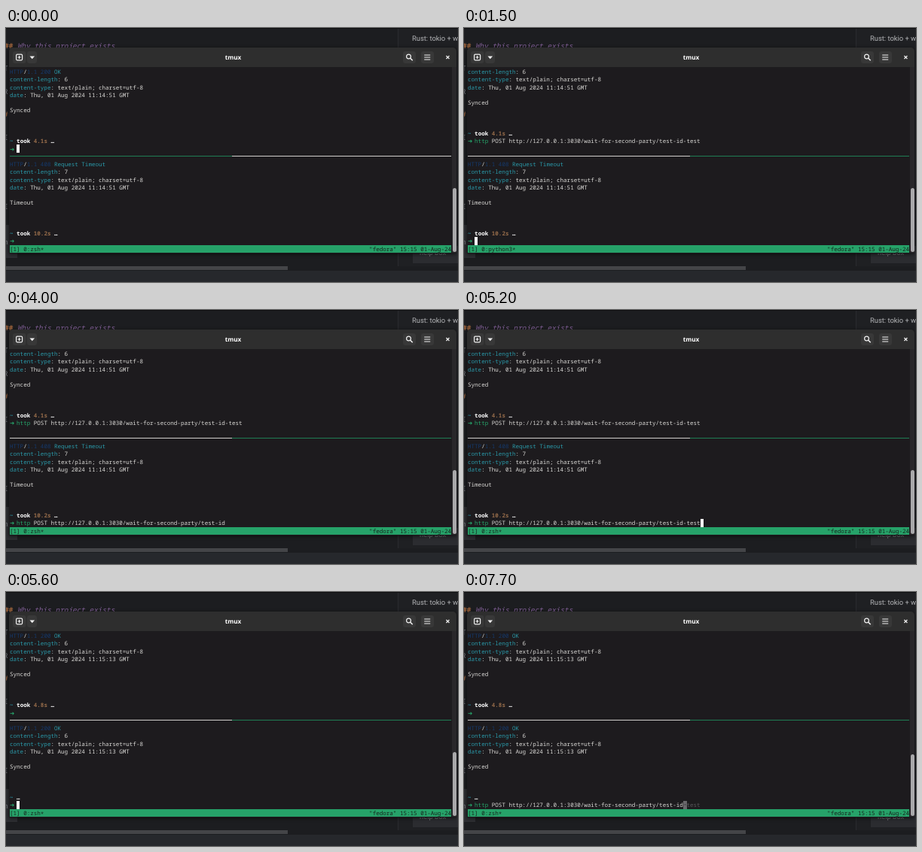
Animation of 600 by 338 pixels, one loop 8 s. Source, as an HTML page:

```html
<!DOCTYPE html>
<html lang="en">
<head>
<meta charset="utf-8">
<title>tmux</title>
<style>
  html, body { margin: 0; width: 100%; height: 100%; overflow: hidden; background: #1c1d20; }
  #stage { position: relative; width: 600px; height: 338px; overflow: hidden; text-rendering: geometricPrecision; }
  #stage div, svg { position: absolute; white-space: pre; }
  .mono, .row { font-family: "Noto Sans Mono", "DejaVu Sans Mono", monospace; }

  /* page behind the window */
  .side { left: 520px; top: 0; width: 80px; height: 317px; background: #1f2023; border-left: 1px solid #2a2b2f; }
  .brim { left: 0; top: 0; width: 600px; height: 1px; background: #0d0d0f; }
  .label { left: 539px; top: 8px; font: 9.4px/14px Roboto, sans-serif; color: #b4b5b8; }
  .heading { left: -2px; top: 17px; font-size: 9.4px; line-height: 14px; color: #84629a; font-style: italic; }
  .heading b { color: #a5683e; font-style: normal; }
  .edge { left: -3px; font-size: 9.4px; line-height: 12px; color: #77797e; }
  .card { left: 540px; top: 290px; width: 60px; height: 23px; background: #2b2c30; }
  .chip { left: 0; top: 262px; width: 15px; height: 44px; background: #2d2e32; }
  .hbar { left: 0; top: 317px; width: 374px; height: 5px; background: #444548; }
  .foot { left: 0; top: 323px; width: 600px; height: 15px; background: #26282c; }

  /* terminal window */
  .win { left: 4px; top: 26px; width: 594px; height: 273.5px; background: #1d1b1e; border-radius: 5px 5px 0 0; box-shadow: 0 1px 5px #0009; }
  .bar { left: 4px; top: 26px; width: 594px; height: 26px; background: #2e2e2e; border-radius: 5px 5px 0 0; }
  .title { left: 5px; top: 33px; width: 593px; text-align: center; font: bold 8.2px/14px "Open Sans", "Noto Sans", sans-serif; color: #fff; }
  .trough { left: 592px; top: 52px; width: 6px; height: 247px; background: #29272a; }
  .thumb { left: 593px; width: 5px; border-radius: 2.5px; background: #a9a8aa; }
  .row { left: 5px; height: 10.24px; font-size: 7.573px; line-height: 10.24px; color: #dad9d6; }
  .row i { font-style: normal; }
  .c { color: #2a98a8; } .n { color: #15396b; } .g { color: #26a269; }
  .w { color: #fff; } .o { color: #936a49; } .d { color: #59575b; }
  .arrow { display: inline-block; width: .6em; height: 10.24px; vertical-align: top; font-family: "DejaVu Sans", sans-serif; }
  .star { position: relative; top: 1.5px; }
  .rule { top: 170px; height: 1px; }
  .status { left: 5px; top: 289.1px; width: 586.2px; height: 10.3px; background: #26a269; }
  .ink { color: #17241d; }
  #cur { width: 4.4px; height: 10.8px; background: #fff; color: #1d1b1e; }
</style>
</head>
<body>
<div id="stage">
  <div class="side"></div>
  <div class="brim"></div>
  <div class="label">Rust: tokio + warp</div>
  <div class="heading mono"><b>##</b> Why this project exists</div>
  <div class="edge mono" style="top:48px">T</div>
  <div class="edge mono" style="top:79px">R</div>
  <div class="edge mono" style="top:109px;color:#a5683e">#</div>
  <div class="edge mono" style="top:140px">I</div>
  <div class="edge mono" style="top:232px">I</div>
  <div class="chip"></div>
  <div class="edge mono" style="top:279px">h</div>
  <div class="card"></div>
  <div class="label" style="left:549px;top:293px;color:#77787b">help box</div>
  <div class="hbar"></div>
  <div class="foot"></div>

  <div class="win"></div>
  <div class="bar"></div>
  <div class="title">tmux</div>
  <svg width="600" height="60" fill="none" stroke="#f2f2f2" stroke-width="1.2">
    <g fill="#383838" stroke="none">
      <rect x="9" y="31" width="17.5" height="16" rx="3"/>
      <rect x="28" y="31" width="13" height="16" rx="3"/>
      <rect x="527" y="31" width="17" height="16" rx="3"/>
      <rect x="551" y="31" width="17" height="16" rx="3"/>
    </g>
    <rect x="13.6" y="35.2" width="8" height="7.6" rx="1.2"/>
    <path d="M17.6 37v4M15.6 39h4"/>
    <path d="M31.5 37.6h6.6l-3.3 3.6z" fill="#f2f2f2" stroke="none"/>
    <circle cx="534.5" cy="38" r="2.9"/>
    <path d="M536.7 40.2l3 3" stroke-width="1.5"/>
    <path d="M555.2 36h8M555.2 39h8M555.2 42h8"/>
    <path d="M584.4 37l4 4M588.4 37l-4 4"/>
  </svg>
  <div class="trough"></div>
  <div class="thumb" id="thumb"></div>
  <div class="rule" id="ruleL" style="left:5px;width:295px"></div>
  <div class="rule" id="ruleR" style="left:300px;width:291px"></div>
  <div class="status"></div>
  <div id="cur" class="row"></div>
</div>
<script>
const LOOP = 8000, CELL = 4.544, LINE = 10.24, LEFT = 5, TOP = 54.2, CURSOR_TOP = 53;
const URL_TEXT = 'http://127.0.0.1:3030/wait-for-second-party/test-id-test';
const BASE = URL_TEXT.length - 5;
const TOP_KEYS = [300, 400, 500, 600, 700];
const BOTTOM_KEYS = [4200, 4400, 4700, 4900, 5200];
const $ = id => document.getElementById(id);
const paint = (cls, text) => `<i class="${cls}">${text}</i>`;
const bold = (cls, text) => `<b class="${cls}">${text}</b>`;
const head = (key, value) => paint('c', key) + ': ' + value;

const rows = Array.from({ length: 24 }, (_, i) => {
  const el = document.createElement('div');
  el.className = 'row';
  el.style.top = TOP + i * LINE + 'px';
  $('stage').insertBefore(el, $('cur'));
  return el;
});
const clock = rows[23].cloneNode();
clock.classList.add('ink');
clock.style.left = LEFT + 105 * CELL + 'px';
clock.textContent = '"fedora" 15:15 01-Aug-24';
$('stage').append(clock);
rows[23].classList.add('ink');

function prompt(typed, ghost = '') {
  const line = bold('g arrow', '➜') + ' ';
  return typed ? line + paint('g', 'http') + ' POST ' + URL_TEXT.slice(0, typed) + paint('d', ghost) : line;
}

function reply(code, reason, body, time, took, last) {
  return [
    paint('n', 'HTTP') + '/' + paint('n', '1.1 ' + code) + ' ' + paint('c', reason),
    head('content-length', body.length),
    head('content-type', 'text/plain; charset=utf-8'),
    head('date', `Thu, 01 Aug 2024 ${time} GMT`),
    '', body, '', '', '',
    bold('c', '~') + ' ' + (took ? bold('w', 'took ') + bold('o', took) + ' ' : '') + bold('w', '…'),
    last
  ];
}

const scroll = list => [...list.slice(1), ''];
const typedAt = (t, keys) => BASE + keys.filter(k => t >= k).length;

function topPane(t) {
  if (t >= 5500) return reply(200, 'OK', 'Synced', '11:15:13', '4.8s', prompt(0));
  const typed = t < 100 ? 0 : typedAt(t, TOP_KEYS);
  const list = reply(200, 'OK', 'Synced', '11:14:51', '4.1s', prompt(typed));
  return t < 1000 ? list : scroll(list);
}

function bottomPane(t) {
  if (t >= 5500) {
    const last = t < 6400 ? prompt(0) : prompt(BASE, '-test');
    return reply(200, 'OK', 'Synced', '11:15:13', '', last);
  }
  const typed = t < 1900 ? 0 : typedAt(t, BOTTOM_KEYS);
  const list = reply(408, 'Request Timeout', 'Timeout', '11:14:51', '10.2s', prompt(typed));
  return t < 5400 ? list : scroll(list);
}

// Cursor column, or -1 while blinked off
function cursorCol(t) {
  if (t < 100) return 2;
  if (t < 1000) return 12 + typedAt(t, TOP_KEYS);
  if (t < 1400) return 0;
  if (t < 1900) return 2;
  if (t < 4200) return Math.floor((t - 1900) / 600) % 2 ? -1 : 12 + BASE;
  if (t < 5400) return 12 + typedAt(t, BOTTOM_KEYS);
  if (t < 5500) return 0;
  if (t < 6400) return t < 6100 ? 2 : -1;
  return t >= 7100 && t < 7700 ? -1 : 12 + BASE;
}

function put(el, html) {
  if (el.shown !== html) el.innerHTML = el.shown = html;
}

function draw(t) {
  topPane(t).forEach((html, i) => put(rows[i], html));
  bottomPane(t).forEach((html, i) => put(rows[i + 12], html));
  put(rows[23], `[1] 0:${t >= 1500 && t < 2000 ? 'python3' : 'zsh'}${paint('star', '*')}`);

  const upper = t < 1400, onGhost = t >= 6400, col = cursorCol(t);
  $('ruleL').style.background = upper ? '#1f7d54' : '#d0cfcc';
  $('ruleR').style.background = upper ? '#d0cfcc' : '#1f7d54';

  const cur = $('cur');
  cur.style.display = col < 0 ? 'none' : 'block';
  cur.style.left = LEFT + col * CELL + 'px';
  cur.style.top = CURSOR_TOP + (upper ? 10 : 22) * LINE + 'px';
  cur.style.background = onGhost ? '#69676b' : '#fff';
  put(cur, onGhost ? '-' : '');

  const y = t < 7000 ? 212.5 : 216;
  $('thumb').style.top = y + 'px';
  $('thumb').style.height = 297.5 - y + 'px';
}

const start = performance.now();
function tick() {
  draw((performance.now() - start) % LOOP);
  requestAnimationFrame(tick);
}
tick();
</script>
</body>
</html>
```
